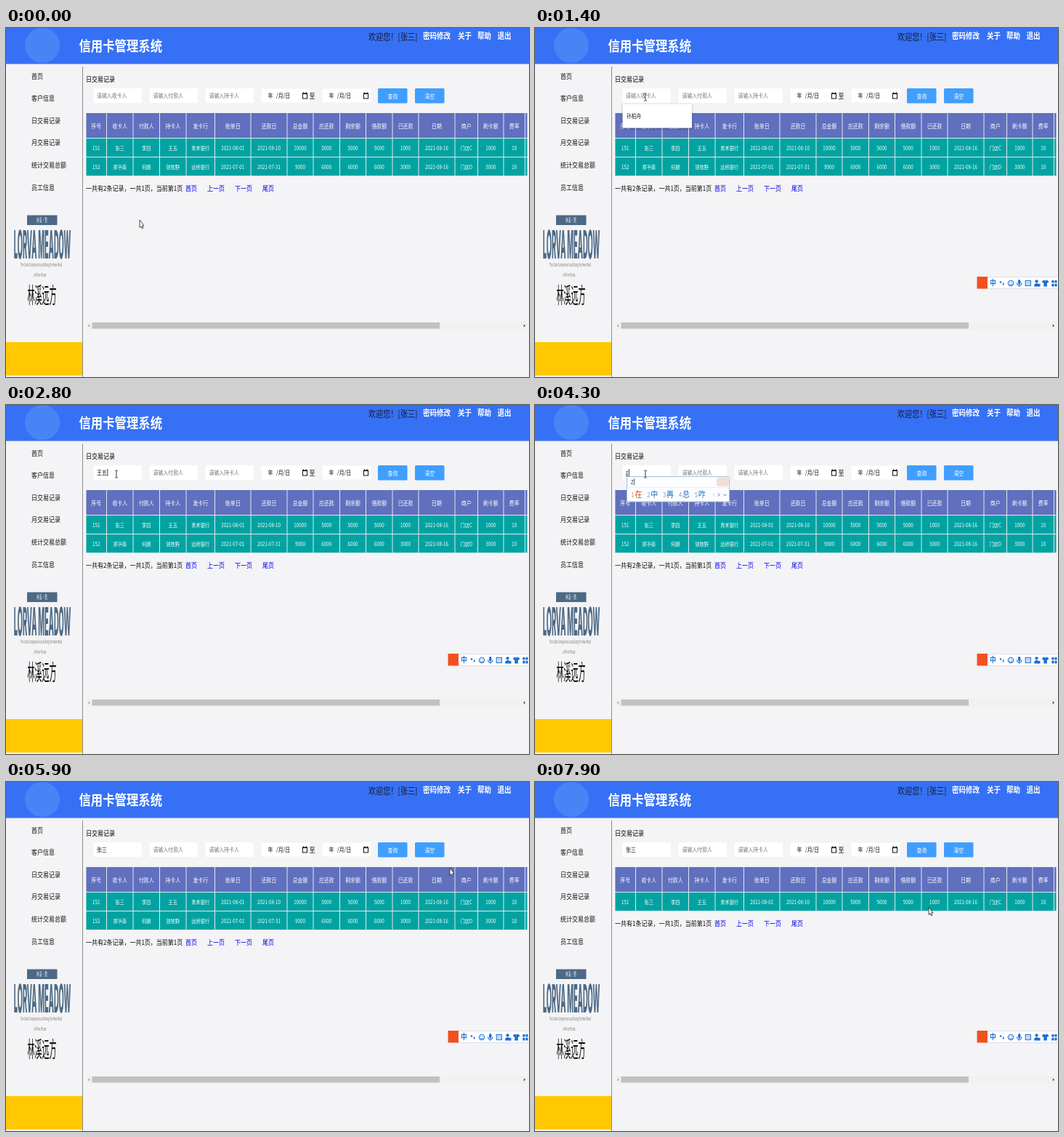
An HTML page that plays this animation: 720 px wide and 480 px high, repeating every 8000 ms.

```html
<!DOCTYPE html>
<html>
<head>
<meta charset="utf-8">
<title>信用卡管理系统</title>
<style>
  html, body { margin: 0; width: 100%; height: 100%; overflow: hidden; background: #f4f3f5; }
  svg { display: block; width: 720px; height: 480px; }
  text { font-family: "Noto Sans CJK SC", "Noto Sans CJK JP", "Noto Sans", sans-serif; white-space: pre; }
  .latin { font-family: Inter, "Liberation Sans", sans-serif; }

  #pointer { animation: travel 8s linear infinite; }
  #arrow { animation: arrow 8s step-end infinite; }
  #beam { animation: beam 8s step-end infinite; }
  #tray { animation: tray 8s step-end infinite; }
  #hints { animation: hints 8s step-end infinite; }
  #row2 { animation: row2 8s step-end infinite; }
  #pager { animation: pager 8s step-end infinite; }

  @keyframes travel {
    0%, 2.5% { transform: translate(184px, 264px); animation-timing-function: ease-in-out; }
    11.25%, 65% { transform: translate(152px, 95px); animation-timing-function: ease-in-out; }
    73.5%, 78.75% { transform: translate(611px, 118px); animation-timing-function: ease-in-out; }
    87.5%, 92.5% { transform: translate(531px, 90px); animation-timing-function: ease-in-out; }
    98.5%, 100% { transform: translate(542px, 172px); }
  }
  @keyframes arrow { 0% { opacity: 1; } 10.6% { opacity: 0; } 66.5% { opacity: 1; } }
  @keyframes beam { 0% { opacity: 0; } 10.6% { opacity: 1; } 66.5% { opacity: 0; } }
  @keyframes tray { 0% { opacity: 0; } 12.5% { opacity: 1; } 100% { opacity: 1; } }
  @keyframes hints { 0% { opacity: 0; } 13.75% { opacity: 1; } 25% { opacity: 0; } }
  @keyframes row2 { 0% { opacity: 1; } 92.5% { opacity: 0; } 100% { opacity: 0; } }
  @keyframes pager {
    0% { transform: none; }
    92.5%, 100% { transform: translateY(-26px); }
  }
</style>
</head>
<body>
<svg id="stage" viewBox="0 0 720 480"></svg>
<script>
const NS = 'http://www.w3.org/2000/svg';
const SQUEEZE = 27 / 32; // a 16:9 screen shown at 3:2
const stage = document.getElementById('stage');

function add(parent, tag, attrs = {}) {
  const el = document.createElementNS(NS, tag);
  for (const key in attrs) el.setAttribute(key, attrs[key]);
  return parent.appendChild(el);
}
const group = (id, parent = stage) => add(parent, 'g', { id });
const rect = (p, x, y, width, height, fill, more) =>
  add(p, 'rect', { x, y, width, height, fill, ...more });
const path = (p, d, more) => add(p, 'path', { d, fill: 'none', ...more });

// y is the middle of the line of text
function label(p, x, y, str, size, fill, { squeeze = SQUEEZE, ...more } = {}) {
  const el = add(p, 'text', {
    transform: `translate(${x} ${y + size * 0.37}) scale(${squeeze} 1)`,
    'font-size': size, fill, ...more
  });
  el.textContent = str;
  return el;
}
const mid = { 'text-anchor': 'middle' };

function drawHeader() {
  rect(stage, 0, 0, 720, 49.5, '#3671f5');
  add(stage, 'circle', { cx: 50, cy: 24, r: 24, fill: '#4785f7' });
  label(stage, 100.5, 24.5, '信用卡管理系统', 19.4, '#fff', { 'font-weight': 900 });
  label(stage, 499, 13, '欢迎您！[张三]', 12, '#151a2c');
  [[574, '密码修改'], [622, '关于'], [649, '帮助'], [676.5, '退出']].forEach(([x, s]) =>
    label(stage, x, 11, s, 11.3, '#fff', { 'font-weight': 700 }));
}

function drawSidebar() {
  ['首页', '客户信息', '日交易记录', '月交易记录', '统计交易总额', '员工信息'].forEach((s, i) =>
    label(stage, 35, 66 + i * 30.6, s, 9.5, '#111'));
  rect(stage, 105, 53, 1, 427, '#8b8b8d');
  rect(stage, 0, 432, 105, 46, '#ffc800');

  rect(stage, 29, 257.5, 41.5, 13.5, '#4c6985');
  label(stage, 49.5, 264.3, '林溪·数', 7.5, '#e8edf2', { ...mid, squeeze: 0.5 });
  label(stage, 50, 297.5, 'LORVA MEADOW', 53, '#4c6985',
    { ...mid, class: 'latin', squeeze: 0.175, 'font-weight': 800 });
  label(stage, 48.5, 326, 'The Calm Companion Lead Along the New Road', 6.5, '#777', { ...mid, squeeze: 0.4 });
  label(stage, 47, 339.5, 'All Fine Places', 6.5, '#777', { ...mid, squeeze: 0.4 });
  label(stage, 49.5, 367, '林溪远方', 30, '#111', { ...mid, squeeze: 0.335, 'font-weight': 300 });
}

function drawDate(x) {
  rect(stage, x, 83.5, 67, 19, '#fff');
  label(stage, x + 9, 93, '年', 8.2, '#111');
  label(stage, x + 20.5, 93, '/月/日', 8.2, '#111');
  rect(stage, x + 57, 90, 6, 7, 'none', { stroke: '#111' });
  path(stage, `M${x + 56.5} 90.3h7M${x + 58} 88.5v2M${x + 62} 88.5v2`, { stroke: '#111', 'stroke-width': 1.2 });
}

function drawFilters() {
  label(stage, 110, 70, '日交易记录', 9.5, '#000', { 'font-weight': 500 });
  [120.5, 197.5, 274.5].forEach(x => rect(stage, x, 83, 66.5, 20, '#fff', { rx: 1 }));
  label(stage, 202.5, 93, '请输入付款人', 8.2, '#777');
  label(stage, 279.5, 93, '请输入持卡人', 8.2, '#777');
  drawDate(351.5);
  drawDate(435.5);
  label(stage, 417.5, 93.5, '至', 9.5, '#111');
  [[512, '查询'], [563, '清空']].forEach(([x, s]) => {
    rect(stage, x, 83, 40.5, 20.5, '#409eff', { rx: 1.5 });
    label(stage, x + 20.3, 93.5, s, 8.2, '#fff', mid);
  });
}

const edges = [110, 138.5, 175, 211.5, 248, 287.5, 337, 387, 423, 459.5, 495.5,
  532, 568, 618, 649.5, 685, 714.5, 718];

function drawRow(parent, top, height, fill, size, cells) {
  rect(parent, 110, top, 608, height, '#dfe9f0');
  edges.slice(1).forEach((right, i) => {
    const left = edges[i];
    rect(parent, left + 0.5, top, right - left - 1, height - 1, fill);
    if (cells[i]) label(parent, (left + right) / 2, top + height / 2, cells[i], size, '#fff', mid);
  });
}

function drawTable() {
  drawRow(stage, 117, 35, '#6070be', 8.2,
    '序号 收卡人 付款人 持卡人 发卡行 账单日 还款日 总金额 应还款 剩余额 借款额 已还款 日期 商户 刷卡额 费率'.split(' '));
  drawRow(stage, 152, 26, '#00a3a1', 7.4,
    '151 张三 李四 王五 青禾银行 2021-08-01 2021-08-10 10000 5000 5000 5000 1000 2021-08-16 门店C 1000 10'.split(' '));
  drawRow(group('row2'), 178, 26, '#00a3a1', 7.4,
    '152 郑予南 何朗 钱牧野 远桥银行 2021-07-01 2021-07-31 9000 6000 6000 6000 3000 2021-08-16 门店D 3000 10'.split(' '));

  const pager = group('pager');
  const total = label(pager, 110, 220.5, '', 9.5, '#111');
  [[247, '首页'], [277, '上一页'], [315, '下一页'], [353, '尾页']].forEach(([x, s]) =>
    label(pager, x, 220.5, s, 9.5, '#0000ee'));

  rect(stage, 110, 404, 608, 10.5, '#f1f1f1');
  rect(stage, 118.5, 405, 478.5, 8.5, '#c1c1c1');
  path(stage, 'M115.2 407.2l-2.2 2.2l2.2 2.2z', { fill: '#a3a3a3' });
  path(stage, 'M712.8 407.2l2.2 2.2l-2.2 2.2z', { fill: '#444' });
  return total;
}

function drawHints() {
  const g = group('hints');
  g.style.filter = 'drop-shadow(0 1px 1.5px rgba(0,0,0,.3))';
  rect(g, 120.5, 104.5, 95.5, 33, '#fff', { rx: 1.5 });
  label(g, 126, 121.5, '孙柏舟', 8, '#222');
}

function drawTray() {
  const g = group('tray');
  const blue = '#1b6fd6';
  const line = { stroke: blue, 'stroke-width': 1.1 };
  rect(g, 612, 342.5, 112, 16, '#fff', { stroke: '#d5dbe3', 'stroke-width': 0.8, rx: 3 });
  rect(g, 608.5, 342, 14.5, 16.5, '#f2501f');
  label(g, 630.5, 350.5, '中', 10, blue, { ...mid, 'font-weight': 700 });
  add(g, 'circle', { cx: 641, cy: 349.5, r: 1.3, fill: blue });
  path(g, 'M644.5 350.5q1 1.5 -0.5 3', { ...line, 'stroke-width': 1.6 });
  add(g, 'circle', { cx: 655, cy: 351, r: 3.7, fill: 'none', ...line });
  path(g, 'M653.5 349v1.3M656.5 349v1.3M652.8 352q2.2 2.4 4.4 0', line);
  rect(g, 665, 346, 3.4, 6.5, blue, { rx: 1.7 });
  path(g, 'M663.5 350.5q0 3.4 3.2 3.4t3.2 -3.4M666.7 354v2', line);
  rect(g, 675.2, 347.5, 7.2, 7, 'none', line);
  path(g, 'M676.5 349.8h5M676.5 352.3h5', { ...line, 'stroke-dasharray': '1.2 .6' });
  add(g, 'circle', { cx: 690.5, cy: 348.3, r: 2.1, fill: blue });
  path(g, 'M687 355.5q0 -4.5 3.5 -4.5t3.5 4.5z', { fill: blue });
  rect(g, 692.5, 352, 3, 3.5, blue);
  path(g, 'M700.5 346.5q2 1.8 4.2 0l2.8 2.2l-1.6 2l-1 -.5v5.3h-4.6v-5.3l-1 .5l-1.6 -2z', { fill: blue });
  [[711.3, 347], [715.4, 347], [711.3, 351.8], [715.4, 351.8]].forEach(([x, y]) =>
    rect(g, x, y, 3.2, 3.6, blue, { rx: 0.7 }));
}

// candidate window of the input method
function drawPicker() {
  const g = group('picker');
  rect(g, 126.5, 98.5, 141, 34.5, '#fcfdff', { stroke: '#a9c0dc', 'stroke-width': 1, rx: 1.5 });
  rect(g, 250, 99.5, 16.5, 12.5, '#efdfd6', { rx: 3 });
  path(g, 'M128 113.5h138', { stroke: '#e3eaf3', 'stroke-width': 0.8 });
  const typed = label(g, 132, 105.5, '', 9.5, '#2a4f96');
  const caret = rect(g, 136, 101, 0.8, 9.5, '#333');
  const words = [0, 1, 2, 3, 4].map(i => {
    const x = 132.5 + i * 21.8;
    label(g, x, 123.5, i + 1, 9, i ? '#7b9cc4' : '#e98258');
    return label(g, x + 5, 123, '', 11.8, i ? '#1f6fc4' : '#e0491b');
  });
  path(g, 'M247 121.5l-2 2l2 2', { stroke: '#b9c6d6', 'stroke-width': 0.9 });
  path(g, 'M252 121.5l2 2l-2 2M259.5 122.8l2 2l2 -2', { stroke: '#2b6cc0', 'stroke-width': 1 });
  return { g, typed, caret, words };
}

function drawPointer() {
  const g = group('pointer');
  path(group('arrow', g), 'M0 0V10.5L2 8.6L3.4 12L4.8 11.3L3.5 8H6z',
    { fill: '#fff', stroke: '#222', 'stroke-width': 0.8 });
  path(group('beam', g), 'M-1.8 -5h1.3l.5 .6l.5 -.6h1.3M0 -4.4V4.4M-1.8 5h1.3l.5 -.6l.5 .6h1.3',
    { stroke: '#222', 'stroke-width': 0.9 });
}

drawHeader();
drawSidebar();
drawFilters();
const total = drawTable();
const field = label(stage, 125, 93, '', 8.2, '#777');
const fieldCaret = rect(stage, 0, 88, 0.8, 10, '#111');
drawHints();
drawTray();
const picker = drawPicker();
drawPointer();

const put = (el, s) => { if (el.textContent !== s) el.textContent = s; };
const show = (el, on) => el.setAttribute('visibility', on ? 'visible' : 'hidden');
const endOf = (el, x) => x + el.getComputedTextLength() * SQUEEZE + 0.6;

// keys typed between two times, then the word they turn into
const entries = [
  { from: 2050, to: 2650, until: 3450, keys: 'wangwu', word: '王五', first: '我为万问玩', later: '王往望网忘' },
  { from: 4200, to: 5000, until: 8000, keys: 'zhangsan', word: '张三', first: '在中再总咋', later: '张长章掌涨' }
];

function fieldState(t) {
  const e = entries.find(n => t >= n.from && t < n.until);
  if (!e) return { value: '' };
  if (t >= e.to) {
    const erasing = e.until < 8000 && t > e.until - 150;
    return { value: erasing ? e.word[0] : e.word };
  }
  const hold = 200; // pause after the first key
  const rest = (t - e.from - hold) / (e.to - e.from - hold);
  const count = 1 + Math.max(0, Math.floor(rest * e.keys.length));
  const keys = e.keys.slice(0, count);
  return { value: keys, keys, words: count > 2 ? e.later : e.first };
}

function paint(t) {
  const { value, keys, words } = fieldState(t);
  put(field, value || '请输入收卡人');
  field.setAttribute('fill', value ? '#111' : '#777');
  field.setAttribute('text-decoration', keys ? 'underline' : 'none');
  show(fieldCaret, value && t < 5300);
  fieldCaret.setAttribute('x', endOf(field, 125));

  show(picker.g, keys);
  if (keys) {
    put(picker.typed, keys);
    picker.caret.setAttribute('x', endOf(picker.typed, 132));
    picker.words.forEach((el, i) => put(el, words[i]));
  }
  put(total, `一共有${t < 7400 ? 2 : 1}条记录，一共1页，当前第1页`);
}

const start = performance.now();
function tick() {
  paint((performance.now() - start) % 8000);
  requestAnimationFrame(tick);
}
tick();
</script>
</body>
</html>
```
